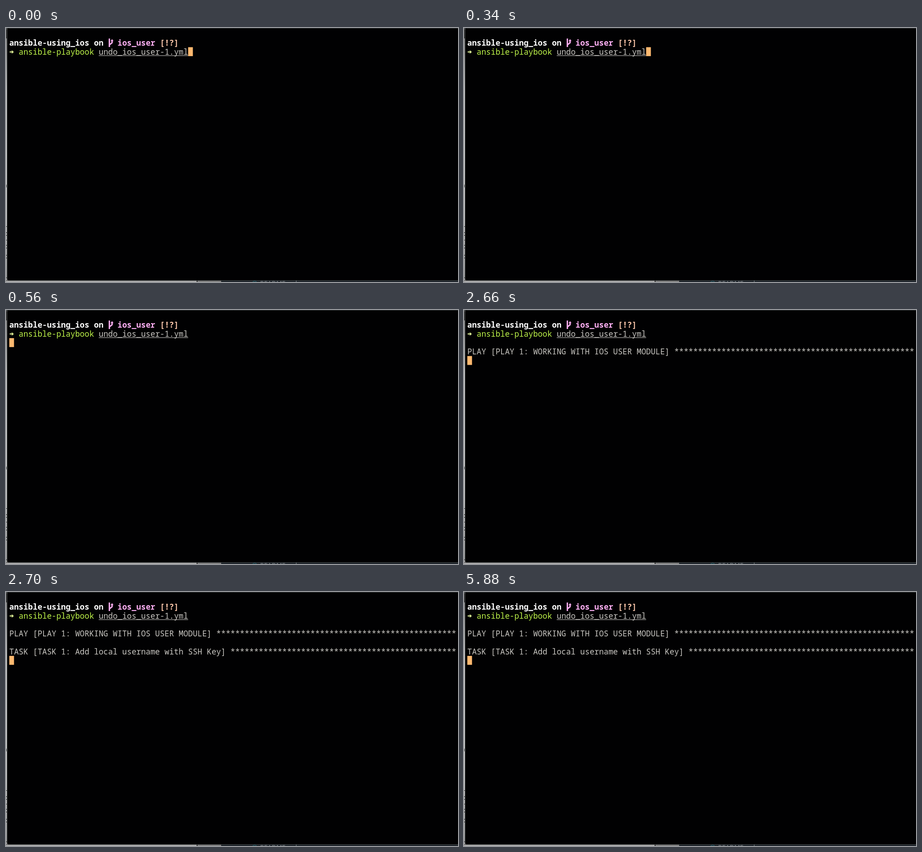
Write an HTML page with a canvas that moves like this. It is 998 px wide and 561 px high and loops after 8 s.

```html
<!DOCTYPE html>
<html lang="en">
<head>
<meta charset="utf-8">
<title>Terminal</title>
<style>
  html, body { margin: 0; width: 100%; height: 100%; overflow: hidden; background: #000; }
  canvas { display: block; }
</style>
</head>
<body>
<canvas id="stage" width="998" height="561"></canvas>
<script>
const ctx = document.getElementById('stage').getContext('2d');
const LOOP = 8000;
const SIZE = 17.32, CELL = SIZE * 0.6, ROW = 19.74;
const LEFT = 7.3, TOP = 2.9, COLS = 95;
const GREY = '#c9c7c2', LIME = '#bff54a', PINK = '#ffb0f4', PEACH = '#ffc9ac';

const colX = col => LEFT + col * CELL;
const rowY = row => TOP + row * ROW;
const banner = title => title + ' ' + '*'.repeat(COLS - title.length - 1);

function rect(x, y, w, h, color) {
  ctx.fillStyle = color;
  ctx.fillRect(x, y, w, h);
}

function text(str, col, row, color, weight = 400) {
  ctx.font = `${weight} ${SIZE}px "Noto Sans Mono", monospace`;
  ctx.fillStyle = color;
  ctx.fillText(str, colX(col), rowY(row) + 16.2);
}

function gradient(x0, y0, x1, y1, ...colors) {
  const g = ctx.createLinearGradient(x0, y0, x1, y1);
  colors.forEach((c, i) => g.addColorStop(i / (colors.length - 1), c));
  return g;
}

// Slivers of the desktop visible around the terminal window
function drawDesktop() {
  rect(0, 0, 998, 561, '#000');
  rect(0, 0, 3, 561, gradient(0, 0, 0, 561, '#777', '#c8c8c8', '#d0d0d0', '#c8c8c8', '#999'));
  rect(0, 2, 2, 21, '#333');
  rect(0, 346, 1, 6, '#333');
  for (const y of [438, 468, 551]) rect(0, y, 2, 1, '#222');
  for (const y of [451, 479, 501]) {
    rect(0, y, 1.5, 2, '#333');
    rect(0, y + 6, 1.5, 2, '#333');
  }
  rect(0, 557, 421, 4, gradient(0, 557, 0, 561, '#555', '#ccc'));
  rect(421, 557, 1.5, 4, '#111');
  rect(422.5, 557, 52.5, 4, gradient(0, 557, 0, 561, '#444', '#999'));
  rect(475, 557, 523, 4, '#20262c');

  ctx.strokeStyle = '#276a78';
  ctx.lineWidth = 1.2;
  ctx.beginPath();
  ctx.arc(549, 564, 5, 0, Math.PI * 2);
  ctx.stroke();
  ctx.font = '14px "Noto Sans", sans-serif';
  ctx.fillStyle = '#7b8287';
  ctx.fillText('README.md', 561, 569);

  rect(0, 0, 998, 1, '#20282a');
  rect(184, 0, 184, 1, '#111719');
  ctx.fillStyle = '#000';
  ctx.strokeStyle = '#383c3d';
  ctx.lineWidth = 1;
  ctx.beginPath();
  ctx.roundRect(2.5, 0.5, 1000, 557, 4);
  ctx.fill();
  ctx.stroke();
  rect(3, 1, 995, 556, '#010102');
}

function drawBranch() {
  ctx.save();
  ctx.translate(colX(21), rowY(1));
  ctx.strokeStyle = ctx.fillStyle = PINK;
  ctx.lineWidth = 3;
  ctx.beginPath();
  ctx.moveTo(2.7, 0.5);
  ctx.lineTo(2.7, 19.3);
  ctx.moveTo(2.7, 14.8);
  ctx.lineTo(8.6, 10);
  ctx.lineTo(8.6, 5);
  ctx.stroke();
  ctx.beginPath();
  ctx.moveTo(8.6, 1.8);
  ctx.lineTo(11.8, 6.4);
  ctx.lineTo(5.4, 6.4);
  ctx.fill();
  ctx.restore();
}

function drawArrow() {
  const x = colX(0), y = rowY(2) + 10.5;
  ctx.strokeStyle = ctx.fillStyle = '#e3f59a';
  ctx.lineWidth = 2.2;
  ctx.beginPath();
  ctx.moveTo(x + 0.8, y);
  ctx.lineTo(x + 6.5, y);
  ctx.stroke();
  ctx.beginPath();
  ctx.moveTo(x + 5, y - 4.2);
  ctx.lineTo(x + 10, y);
  ctx.lineTo(x + 5, y + 4.2);
  ctx.lineTo(x + 6, y);
  ctx.fill();
}

function drawPrompt() {
  text('ansible-using_ios on', 0, 1, '#fff', 600);
  drawBranch();
  text('ios_user', 23, 1, PINK, 600);
  text('[!?]', 32, 1, PEACH, 600);
  drawArrow();
  text('ansible-playbook', 2, 2, LIME);
  text('undo_ios_user-1.yml', 19, 2, GREY);
  rect(colX(19), rowY(2) + 18.1, 19 * CELL, 1.1, GREY);
}

function cursorAt(t) {
  if (t < 560) return [38, 2];
  if (t < 2660) return [0, 3];
  return [0, t < 2700 ? 5 : 7];
}

function draw(t) {
  drawDesktop();
  drawPrompt();
  if (t >= 2660) text(banner('PLAY [PLAY 1: WORKING WITH IOS USER MODULE]'), 0, 4, GREY);
  if (t >= 2700) text(banner('TASK [TASK 1: Add local username with SSH Key]'), 0, 6, GREY);
  const [col, row] = cursorAt(t);
  rect(colX(col), rowY(row), CELL, ROW, '#ffb970');
}

const start = performance.now();
function tick() {
  draw((performance.now() - start) % LOOP);
  requestAnimationFrame(tick);
}
tick();
</script>
</body>
</html>
```
